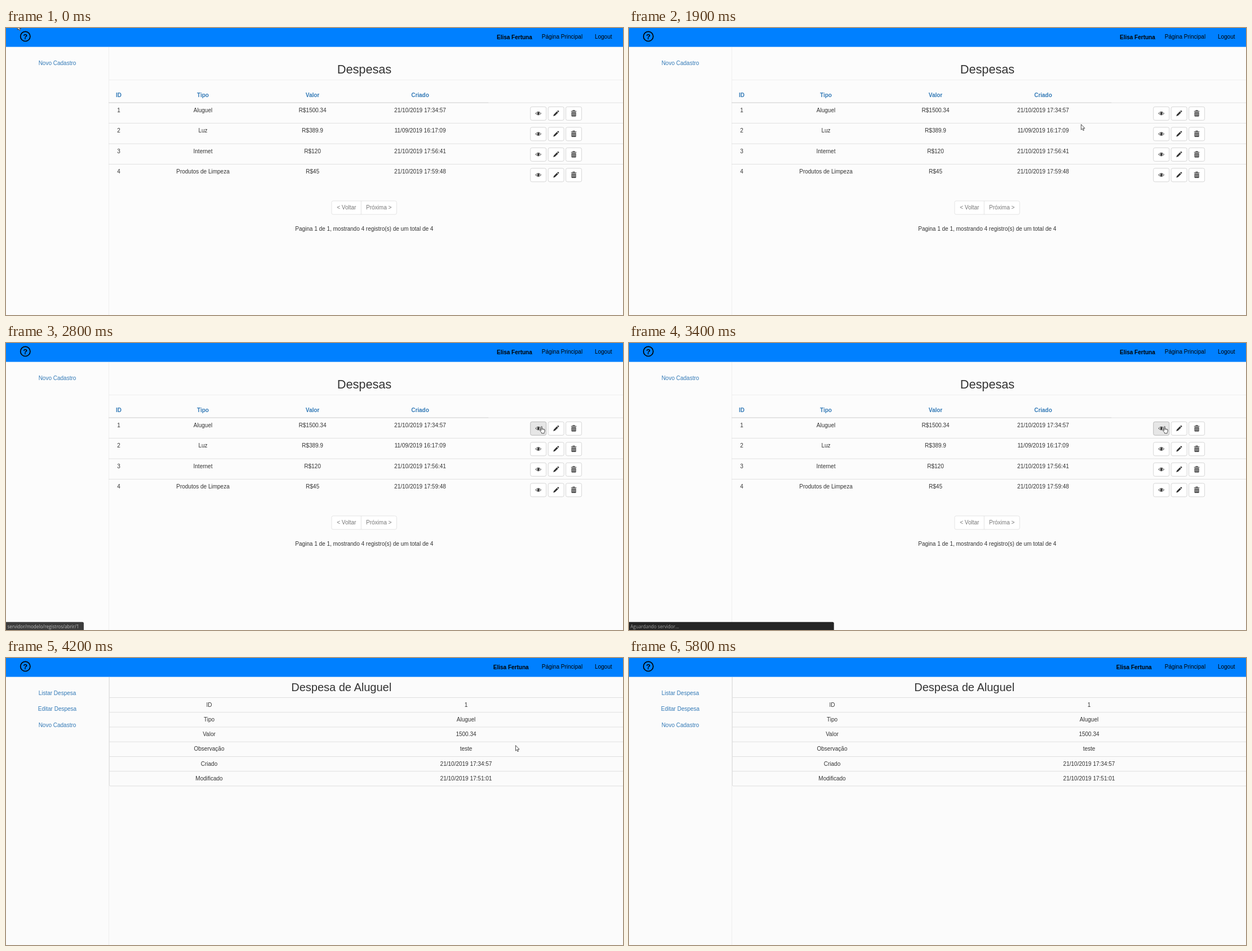
An HTML page that plays this animation: 1095x511 px, repeating every 6600 ms.

```html
<!DOCTYPE html>
<html lang="pt-BR">
<head>
<meta charset="utf-8">
<title>Despesas</title>
<style>
  html, body { margin: 0; width: 100%; height: 100%; overflow: hidden; background: #fcfcfc; }
  svg { display: block; }
  text { font: 10px "Liberation Sans", Arial, sans-serif; fill: #333; text-anchor: middle; }
  .bold { font-weight: bold; }
  .link { fill: #337ab7; }
  .dark { fill: #000; }
  .muted { fill: #777; }
  .status { font: 8.1px "Open Sans", sans-serif; text-anchor: start; }
</style>
</head>
<body>
<svg id="stage" width="1095" height="511" viewBox="0 0 1095 511"></svg>
<script>
const LOOP = 6600;
const DETAIL_AT = 3800;

const text = (x, y, label, cls = '', size = 0) =>
  `<text x="${x}" y="${y}" class="${cls}"${size ? ` style="font-size:${size}px"` : ''}>${label}</text>`;
const rect = (x, y, w, h, fill, extra = '') =>
  `<rect x="${x}" y="${y}" width="${w}" height="${h}" fill="${fill}" ${extra}/>`;
const group = (id, content) => `<g id="${id}">${content}</g>`;

const eye = `<path d="M-5.4 0Q0-6.6 5.4 0Q0 6.6-5.4 0Z" fill="#333"/>
  <path d="M-4.2 0Q-3-2.2-1.7-2.6Q-3.3 .8 0 2.6Q-2.6 2.4-4.2 0ZM4.2 0Q3-2.2 1.7-2.6Q3.3 .8 0 2.6Q2.6 2.4 4.2 0Z" fill="#fff"/>
  <path d="M-1.4-.6Q-1.2-1.8 0-2" fill="none" stroke="#fff" stroke-width=".7"/>`;
const pencil = `<path d="M-5 5L-4 1.8L1.4-3.5L3.6-1.3L-1.8 4ZM2-4.1L3.1-5.1Q3.6-5.4 4.1-5L5.1-4Q5.5-3.5 5.1-3L4.2-2Z" fill="#333"/>`;
const trash = `<path d="M-1.5-4.4V-5.3H1.5V-4.4M-4.8-3.8H4.8" fill="none" stroke="#333" stroke-width="1.1"/>
  <path d="M-4-2.4H4V4.3Q4 5.4 3 5.4H-3Q-4 5.4-4 4.3Z" fill="#333"/>
  <path d="M-2.2-1.4V4.2M0-1.4V4.2M2.2-1.4V4.2" stroke="#fff" stroke-width=".8"/>`;

const button = (x, y, icon, id = '') =>
  `<rect ${id && `id="${id}"`} x="${x}" y="${y}" width="28" height="24" rx="2.8" fill="#fff" stroke="#ccc" stroke-width=".8"/>
   <g transform="translate(${x + 14} ${y + 11.8})">${icon}</g>`;

const columns = [200, 349.5, 544, 735];
const expenses = [
  ['1', 'Aluguel', 'R$1500.34', '21/10/2019 17:34:57'],
  ['2', 'Luz', 'R$389.9', '11/09/2019 16:17:09'],
  ['3', 'Internet', 'R$120', '21/10/2019 17:56:41'],
  ['4', 'Produtos de Limpeza', 'R$45', '21/10/2019 17:59:48']
];
const details = [
  ['ID', '1'], ['Tipo', 'Aluguel'], ['Valor', '1500.34'], ['Observação', 'teste'],
  ['Criado', '21/10/2019 17:34:57'], ['Modificado', '21/10/2019 17:51:01']
];

const listPage =
  text(902.4, 19.8, 'Elisa Fertuna', 'bold dark') +
  text(91, 65.6, 'Novo Cadastro', 'link') +
  text(636, 81, 'Despesas', '', 21.7) +
  rect(182, 92, 913, 1, '#eee') +
  ['ID', 'Tipo', 'Valor', 'Criado'].map((label, i) => text(columns[i], 122.7, label, 'bold link')).join('') +
  rect(182, 132.4, 674, 1.2, '#d6d6d6') +
  expenses.map((row, i) => {
    const y = 36.5 * i;
    return rect(i ? 182 : 856, 132.6 + y, i ? 913 : 239, .9, '#ddd') +
      row.map((value, c) => text(columns[c], 149.6 + y, value)).join('') +
      button(930.7, 140.3 + y, eye, i ? '' : 'viewButton') +
      button(962.2, 140.3 + y, pencil) +
      button(993.6, 140.3 + y, trash);
  }).join('') +
  rect(577.9, 307.9, 115.4, 24, '#fff', 'rx="2.8" stroke="#ddd" stroke-width=".8"') +
  rect(629.8, 308, .8, 24, '#ddd') +
  text(604.3, 323.3, '&lt; Voltar', 'muted') +
  text(661.7, 323.3, 'Próxima &gt;', 'muted') +
  text(635.8, 361, 'Pagina 1 de 1, mostrando 4 registro(s) de um total de 4');

const detailPage =
  rect(0, 34, 1095, 477, '#fbfbfb') +
  rect(182, 34, 1, 477, '#eee') +
  text(896.2, 19.8, 'Elisa Fertuna', 'bold dark') +
  ['Listar Despesa', 'Editar Despesa', 'Novo Cadastro']
    .map((label, i) => text(91, 65.6 + 28.5 * i, label, 'link')).join('') +
  text(595.2, 59, 'Despesa de Aluguel', '', 20) +
  details.map(([label, value], i) => {
    const y = 26.25 * i;
    return rect(183, 70 + y, 912, .9, '#ddd') +
      text(360.5, 86.7 + y, label) + text(816.5, 86.7 + y, value);
  }).join('') +
  '<path d="M183.4 34V226Q183.4 227.9 185.4 227.9H1095" fill="none" stroke="#ddd"/>';

const header =
  rect(0, 0, 1095, 33.6, '#0080ff') +
  '<circle cx="34.3" cy="14.9" r="8.6" fill="none" stroke="#000" stroke-width="1.7"/>' +
  text(34.3, 19.5, '?', 'bold dark', 13) +
  text(987, 19, 'Página Principal', 'dark') +
  text(1060.2, 19, 'Logout', 'dark');

const statusBar = (id, width, fill, color, label) => group(id,
  rect(-4, 496.8, width + 4, 20, fill, 'rx="2.5"') +
  `<text class="status" x="2.5" y="507.6" style="fill:${color}">${label}</text>`);

const cursors =
  group('arrow', '<path d="M.4 .6V10.2L2.5 8.2L4 11.6L5.5 10.9L4 7.6H7Z" fill="#fff" stroke="#222" stroke-width=".8"/>') +
  group('beam', '<path d="M.4 .5H3.6M2 .5V11.5M.4 11.5H3.6" fill="none" stroke="#333" stroke-width=".7"/>') +
  group('hand', `<path d="M2.6 8V1.6Q2.6 .5 3.5 .5T4.4 1.6V5Q5.2 4.3 6 5.2Q6.9 4.7 7.5 5.6Q9.1 5.2 9.1 6.8V9
    Q9 10.4 8.1 11.3V12.8H3.6V11.7L.6 8.1Q.2 7.1 1.2 6.8Q1.8 6.7 2.6 8Z" fill="#fff" stroke="#222" stroke-width=".8"/>
    <path d="M4.4 5V7M6 5.3V7M7.6 5.8V7.2" stroke="#222" stroke-width=".5"/>`);

document.getElementById('stage').innerHTML =
  rect(0, 0, 1095, 511, '#fcfcfc') +
  rect(182, 34, 1, 477, '#eee') +
  header + group('list', listPage) + group('detail', detailPage) +
  statusBar('linkStatus', 138, '#3c3c3c', '#bbb', 'servidor/modelo/registros/abrir/1') +
  statusBar('waitStatus', 363.7, '#262626', '#a0a0a0', 'Aguardando servidor...') +
  cursors;

// Pointer path: [time, x, y]
const path = [
  [0, 20, -7], [100, 270, 150], [200, 600, 345], [300, 755, 150],
  [700, 755, 150], [900, 475, 124], [1000, 701, 172],
  [1400, 701, 172], [1700, 720, 172],
  [1800, 720, 172], [1900, 802, 171], [2100, 892, 146],
  [2200, 892, 146], [2300, 902, 169], [2500, 938, 160], [2600, 947, 148],
  [4000, 947, 148], [4200, 904, 155], [4400, 649, 193],
  [4500, 649, 193], [4600, 648, 193],
  [4800, 648, 193], [5000, 570, 205], [5100, 541, 202],
  [5200, 541, 202], [5700, 211, 35], [LOOP, 211, 35]
];

function pointerAt(t) {
  const next = path.findIndex(key => key[0] > t);
  const [t0, x0, y0] = path[next - 1], [t1, x1, y1] = path[next];
  const k = (t - t0) / (t1 - t0);
  return [x0 + (x1 - x0) * k, y0 + (y1 - y0) * k];
}

const byId = id => document.getElementById(id);
const show = (id, visible) => byId(id).style.display = visible ? '' : 'none';

function buttonColors(t) {
  if (t < 2600) return ['#fff', '#ccc'];
  return t >= 2900 && t < 3000 ? ['#d4d4d4', '#8c8c8c'] : ['#e6e6e6', '#adadad'];
}

function draw(now) {
  // The screen refreshes ten times a second
  const t = Math.floor(now % LOOP / 100) * 100;
  show('list', t < DETAIL_AT);
  show('detail', t >= DETAIL_AT);
  show('linkStatus', t >= 2800 && t < 3400);
  show('waitStatus', t >= 3400 && t < 4100);

  const [fill, stroke] = buttonColors(t);
  byId('viewButton').setAttribute('fill', fill);
  byId('viewButton').setAttribute('stroke', stroke);

  const shape = t >= 2600 && t < 4100 ? 'hand' : t >= 1000 && t < 1900 ? 'beam' : 'arrow';
  const [x, y] = pointerAt(t);
  for (const id of ['arrow', 'beam', 'hand']) {
    show(id, id === shape && t < 5800);
    byId(id).setAttribute('transform', `translate(${x} ${y})`);
  }
}

const start = performance.now();
function tick() {
  draw(performance.now() - start);
  requestAnimationFrame(tick);
}
tick();
</script>
</body>
</html>
```
